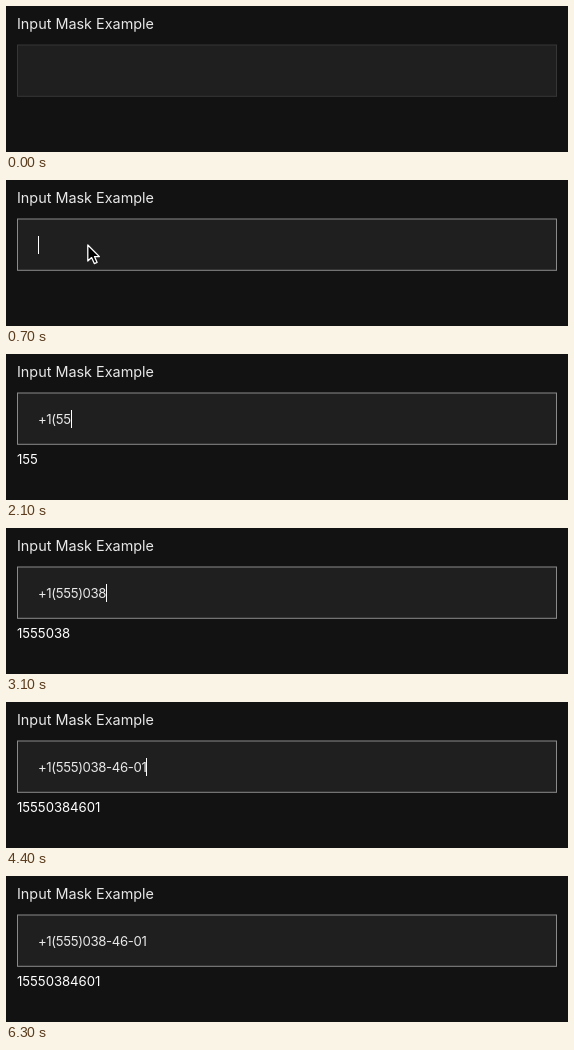
These frames come from a looping animation (562 by 146 pixels, 6700 ms). An HTML page:

```html
<!DOCTYPE html>
<html lang="en">
<head>
<meta charset="utf-8">
<title>Input Mask Example</title>
<style>
  html, body { margin: 0; width: 100%; height: 100%; overflow: hidden; background: #121212; }
  body { position: relative; font: 13.2px/20px Inter, "Liberation Sans", sans-serif; color: #fff; }
  body > * { position: absolute; white-space: pre; }
  #label { left: 11px; top: 8px; font-size: 14.4px; color: #e8e8e8; }
  #stage { left: 0; top: 0; }
  #field { fill: #1f1f1f; stroke: #363636; }
  #field.focus { stroke: #8a8a8a; }
  #masked { left: 32px; top: 55px; letter-spacing: -.37px; color: #e8e8e8; }
  #raw { left: 11px; top: 95px; letter-spacing: -.05px; }
  #caret { top: 56px; width: 1px; height: 18px; background: #fff; }
  #pointer { left: 0; top: 0; overflow: visible; }
</style>
</head>
<body>
<svg id="stage" width="562" height="146">
  <rect id="field" x="11.5" y="39" width="539" height="51.3"/>
</svg>
<div id="label">Input Mask Example</div>
<div id="masked"></div>
<div id="raw"></div>
<div id="caret"></div>
<svg id="pointer" width="14" height="21">
  <path d="M.8 1V17L4.6 13.6L7.3 19.6L10.1 18.4L7.5 12.6H12.4Z"
        fill="#000" stroke="#fff" stroke-width="1.3" stroke-linejoin="round"/>
</svg>
<script>
const LOOP = 6700, FOCUS = 700;
const DIGITS = '15550384601';
const MASK = '+#(###)###-##-##';
const KEYS = [1600, 1800, 2000, 2300, 2600, 2800, 3100, 3400, 3800, 4000, 4400];
const $ = id => document.getElementById(id);
const field = $('field'), masked = $('masked'), raw = $('raw');
const caret = $('caret'), pointer = $('pointer');

function applyMask(digits) {
  let out = '', i = 0;
  for (const ch of MASK) {
    if (i >= digits.length) break;
    out += ch === '#' ? digits[i++] : ch;
  }
  return out;
}

function caretOn(t) {
  return t >= FOCUS && t < 1200 || t >= KEYS[0] && t < 5300 || t >= 5800 && t < 6300;
}

// Pointer position on a 100 ms grid, or null when it is away
function pointerAt(t) {
  const step = Math.floor(t / 100) * 100;
  if (step >= 300 && step < 1000) {
    const left = (1 - Math.min(1, (step - 300) / 400)) ** 2;
    return [81 + 66 * left, 64 + 51 * left];
  }
  if (step >= 1000 && step < 1200) {
    const k = (step - 900) / 200;
    return [81 + 5 * k, 64 - 49 * k];
  }
  return step === 5300 ? [241, 112] : null;
}

function show(el, on) { el.style.visibility = on ? 'visible' : 'hidden'; }

function render(t) {
  const digits = DIGITS.slice(0, KEYS.filter(k => k <= t).length);
  const value = applyMask(digits);
  if (masked.textContent !== value) masked.textContent = value;
  if (raw.textContent !== digits) raw.textContent = digits;
  field.classList.toggle('focus', t >= FOCUS);

  caret.style.left = Math.round(32 + masked.getBoundingClientRect().width) + 'px';
  show(caret, caretOn(t));

  const pos = pointerAt(t);
  show(pointer, pos);
  if (pos) pointer.style.transform = `translate(${pos[0]}px, ${pos[1]}px)`;
}

const start = performance.now();
function tick() {
  render((performance.now() - start) % LOOP);
  requestAnimationFrame(tick);
}
tick();
</script>
</body>
</html>
```
